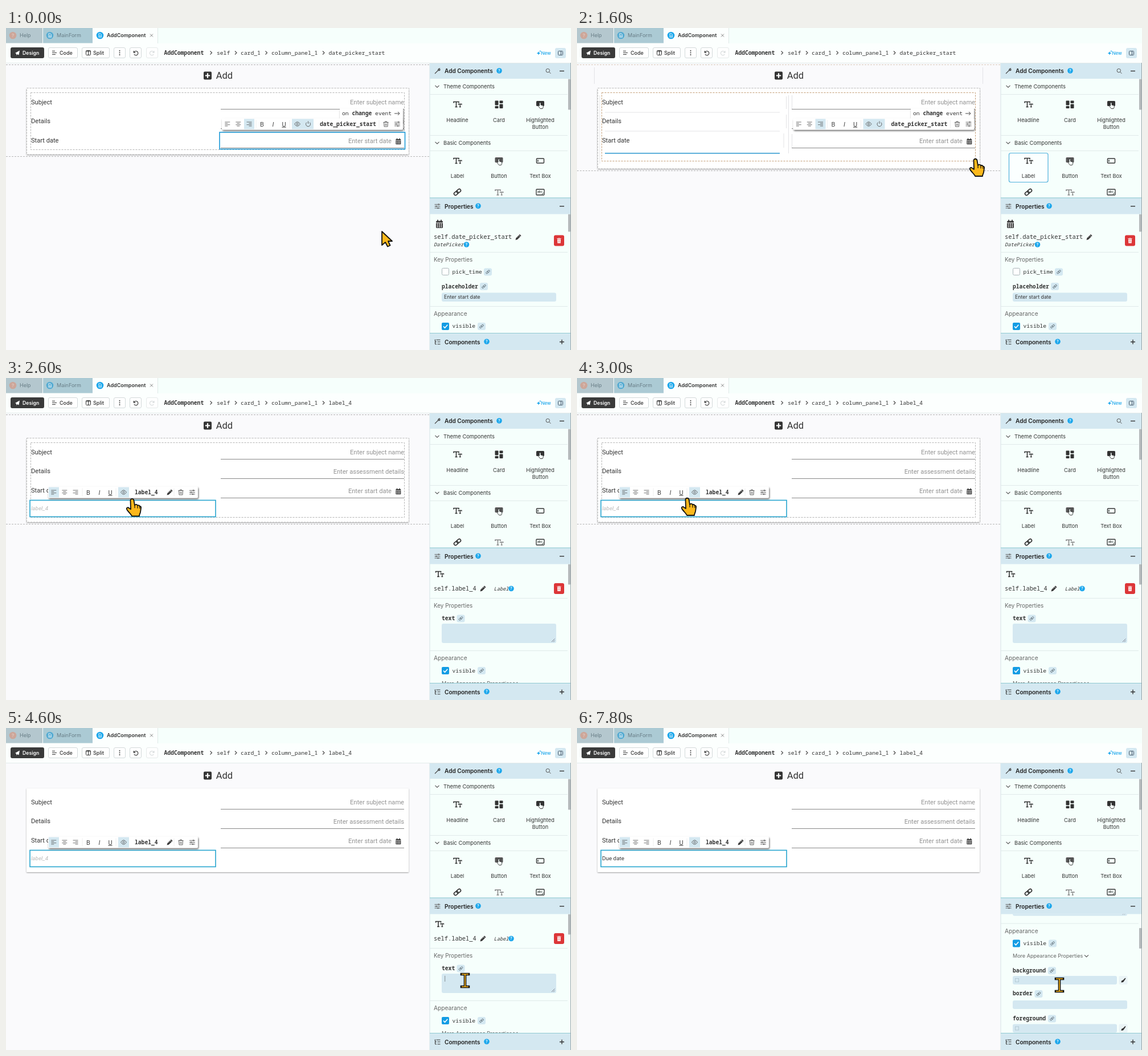
An HTML page that plays this animation: 992x565 px, repeating every 8 s.

```html
<!DOCTYPE html>
<html lang="en">
<head>
<meta charset="utf-8">
<title>Form designer</title>
<style>
html, body { margin: 0; width: 100%; height: 100%; overflow: hidden; background: #fafafc; }
svg { display: block; }
text { white-space: pre; }
.i { font-family: Inter, sans-serif; }
.r { font-family: Roboto, sans-serif; }
.m { font-family: "Noto Sans Mono", "DejaVu Sans Mono", monospace; }
</style>
</head>
<body>
<svg width="992" height="565" viewBox="0 0 992 565">
  <g id="back"></g>
  <g id="form"></g>
  <g id="front"></g>
  <g id="live"></g>
</svg>
<script>
const INK = '#333', BLUE = '#1ca7ec', PALE = '#d4e8f1', MINT = '#f6fffc', GREY = '#929292';
const $ = id => document.getElementById(id);

// drawing helpers
const text = (cls, x, y, s, size, fill = INK, more = '') =>
  `<text class="${cls}" x="${x}" y="${y}" font-size="${size}" fill="${fill}" ${more}>${s}</text>`;
const rect = (x, y, w, h, fill, r = 0, more = '') =>
  `<rect x="${x}" y="${y}" width="${w}" height="${h}" rx="${r}" fill="${fill}" ${more}/>`;
const line = (d, col = INK, w = 1, more = '') =>
  `<path d="${d}" fill="none" stroke="${col}" stroke-width="${w}" ${more}/>`;
const solid = (d, col = INK, more = '') => `<path d="${d}" fill="${col}" ${more}/>`;
const dot = (x, y, r, fill) => `<circle cx="${x}" cy="${y}" r="${r}" fill="${fill}"/>`;
const at = (x, y, s) => `<g transform="translate(${x} ${y})">${s}</g>`;
const hr = (y, x = 744, x2 = 986, col = '#e0eaea') => line(`M${x} ${y}H${x2}`, col);

const MID = 'text-anchor="middle"', END = 'text-anchor="end"';
const SEMI = 'font-weight="600"', BOLD = 'font-weight="700"', ITALIC = 'font-style="italic"';
const mono = (x, y, s, more = '', size = 9.7, col = INK) => text('m', x, y, s, size, col, more);
const ui = (x, y, s, size = 9.2, col = INK, more = '') => text('i', x, y, s, size, col, more);

// icons, centred on 0,0
const icon = {
  tt: (c = INK) => line('M-6.5-2.5V-4.5H2.5V-2.5M-2-4.5V4.5M-4 4.5H0', c, 1.6) +
    line('M2 .8V-.5H7.5V.8M4.8-.5V4.5M3.4 4.5H6.2', c, 1.3),
  card: () => rect(-7, -6.5, 6, 8, INK, 1) + rect(1, -6.5, 6, 4.5, INK, 1) +
    rect(-7, 3, 6, 4, INK, 1) + rect(1, -.5, 6, 7.5, INK, 1),
  press: c => rect(-7, -6, 14, 9, c, 1.5) +
    solid('M-1.5-2.5Q0-4 1-2.5V1L5 2Q6 5 4 7.5H0L-3.5 3Q-3 1.5-1.5 2.5Z', MINT, `stroke="${INK}" stroke-width=".9"`),
  box: () => rect(-6.5, -4, 13, 8, 'none', 1, `stroke="${INK}" stroke-width="1.4"`) + line('M-4-1.8V1.8', INK, 1.4),
  area: () => rect(-7, -5, 14, 10, 'none', 1, `stroke="${INK}" stroke-width="1.3"`) +
    ui(-5, 1, 'abc', 5, INK, SEMI) + line('M3 4L6 1'),
  link: (k = 1, c = INK) => `<g transform="rotate(-40) scale(${k})">` +
    rect(-7, -2.6, 8, 5.2, 'none', 2.6, `stroke="${c}" stroke-width="1.6"`) +
    rect(-1, -2.6, 8, 5.2, 'none', 2.6, `stroke="${c}" stroke-width="1.6"`) + '</g>',
  cal: (k = 1) => `<g transform="scale(${k})">` + rect(-6, -5.5, 12, 12.5, INK, 1.5) +
    line('M-3-7.5V-4M3-7.5V-4', INK, 1.8) +
    line('M-4.5 0H4.5M-4.5 2.5H4.5M-4.5 5H4.5', '#fff', 1.5, 'stroke-dasharray="2 1.4"') +
    line('M-6-2.2H6', '#fff', 1) + '</g>',
  pencil: () => solid('M-5 5L-4 1.5 2.5-5 5-2.5-1.5 4Z') + line('M1-3.5L3.5-1', '#fff', .8) + line('M-2.5 1.5L1.5-2.5', '#999', .8),
  trash: c => line('M-4.5-3H4.5M-1.5-3V-4.5H1.5V-3M-3.5-3L-3 4.5H3L3.5-3M-1-1V3M1-1V3', c, .9),
  bin: () => solid('M-3.6-4H-1.2L-.8-4.6H.8L1.2-4H3.6V-3H-3.6ZM-3-2.3H3L2.7 4.5H-2.7Z', '#fff') +
    line('M-1-1V3.2M1-1V3.2', '#dc3638', .6),
  sliders: () => line('M-5-3.2H5M-5 0H5M-5 3.2H5', '#555', .9) +
    [[2, -3.2], [-2, 0], [1, 3.2]].map(([x, y]) => dot(x, y, 1.3, '#666')).join(''),
  eye: () => line('M-5 0Q0-7.5 5 0Q0 7.5-5 0Z', '#555', .9) + `<circle r="1.6" fill="none" stroke="#555" stroke-width=".9"/>`,
  power: () => line('M-2.4-3A4 4 0 1 0 2.4-3M0-5V-.5', '#555', .9),
  align: k => line([-3.5, -1.2, 1.2, 3.5].map((y, n) => {
    const w = n % 2 ? 5 : 9;
    return `M${-4.5 + (9 - w) * k} ${y}h${w}`;
  }).join(''), '#555', .8),
  doc: () => line('M-2.2-3.2H1L2.5-1.5V3.2H-2.2ZM-1 0H1.2M-1 1.6H1.2', '#fff', .8),
  help: () => dot(0, 0, 4.8, BLUE) + ui(0, 2.5, '?', 7, '#fff', MID + SEMI),
  down: (c = '#555') => line('M-3.5-1.7L0 1.7 3.5-1.7', c, 1.1),
  brush: () => rect(-8, -7.5, 15, 15, '#eaf4f6', 2) + solid('M-4 4Q-4 0-1 0L3-4 4-3 1 1.5Q0 4-4 4Z')
};

const chip = (x, y) => rect(x, y - 6.5, 14, 13, PALE, 3) + at(x + 7, y, icon.link(.55, '#5d6c74'));
const check = (y, on) => on
  ? rect(765, y, 13, 13, '#149ce4', 2) + line(`M768 ${y + 6.5}l2.5 2.7 4.8-5.4`, '#fff', 1.6)
  : rect(765.5, y + .5, 12, 12, '#fff', 2, 'stroke="#aab4b8"');
const remove = y => rect(962, y - 9.5, 18, 19, '#dc3638', 3) + at(971, y, icon.bin());

const header = (y, h, label, qx, glyph, sign) => rect(744, y, 247, h, PALE) +
  at(757.5, y + h / 2, glyph) + ui(770, y + h / 2 + 3.8, label, 10.1, '#222', SEMI) +
  at(qx, y + h / 2 - .5, icon.help()) +
  line(`M972 ${y + h / 2}h8` + (sign ? `M976 ${y + h / 2 - 4}v8` : ''), INK, 1.4);

const button = (x, w, fill = '#fff', edge = '#d3d9da') =>
  rect(x + .5, 34.5, w - 1, 18, fill, 2.5, `stroke="${edge}"`);

function chrome() {
  const grid = [
    [792.5, 134, icon.tt(), ['Headline']], [865.5, 134, icon.card(), ['Card']],
    [938, 134, icon.press(INK), ['Highlighted', 'Button']],
    [792.5, 233, icon.tt(), ['Label']], [865.5, 233, icon.press('#555'), ['Button']],
    [938, 233, icon.box(), ['Text Box']]
  ];
  return rect(0, 0, 992, 61, '#fcfffe') + rect(267, 0, 725, 27, MINT) + hr(61.5, 0, 992, '#e2eae9') +
    rect(0, 0, 64, 26.5, '#b4c7ce') + rect(65, 0, 87, 26.5, '#abcad4') +
    dot(12, 13, 6.3, '#cda699') + ui(12, 16, '?', 8, '#e8d8d2', MID) + ui(24, 16.3, 'Help', 9, '#687d86') +
    dot(77, 13, 6.3, '#55abd2') + at(77, 13, icon.doc()) + ui(89, 16.3, 'MainForm', 9.1, '#687d86') +
    dot(165, 13, 6.3, BLUE) + at(165, 13, icon.doc()) + ui(177, 16.3, 'AddComponent', 9, '#333', SEMI) +
    line('M253 10.5l5 5m0-5l-5 5', '#777', .9) + line('M266.5 0V27', '#e0e8e8') +
    rect(8, 34, 59, 19, '#3a3a3a', 3) + solid('M16 44l8-4.5-1.5 8-2.5-1.5-1.5 2-.5-3z', '#fff') +
    ui(29, 46.8, 'Design', 8.7, '#fff', SEMI) +
    button(74, 52) + line('M81 40.5h5M81 43.5h8M81 46.5h6', INK, 1) + ui(94, 46.8, 'Code', 9, INK, 'font-weight="500"') +
    button(133, 49) + rect(140.5, 39.5, 8, 8, 'none', 1, `stroke="${INK}"`) + line('M144.5 39.5v8M140 41h9') +
    ui(153, 46.8, 'Split', 9, INK, 'font-weight="500"') +
    button(189, 21) + [40, 43.5, 47].map(y => dot(199.5, y, 1, INK)).join('') +
    button(217, 21) + line('M224.3 40v3.2h3.2M224.6 43a3.7 3.7 0 1 1 .3 3', INK, 1.1) +
    button(246, 21, '#fff', '#e6eaea') + line('M260 40v3.2h-3.2M259.7 43a3.7 3.7 0 1 0-.3 3', '#d5d9da', 1.1) +
    mono(277.5, 46.5, 'AddComponent', BOLD) + mono(370, 46.5, 'self') + mono(412, 46.5, 'card_1') +
    mono(466, 46.5, 'column_panel_1') +
    [360, 403.5, 457, 557.5].map(x => line(`M${x - 1.5} 40.5l3 3-3 3`, '#444', 1.1)).join('') +
    solid('M935 41l1 2.3 2.4 1-2.4 1-1 2.3-1-2.3-2.3-1 2.3-1zM938 39l.5 1.3 1.3.5-1.3.5-.5 1.3-.5-1.3-1.3-.5 1.3-.5z', BLUE) +
    ui(939.5, 46.8, 'New', 8, BLUE, 'font-weight="500"') +
    rect(964, 35, 19, 18, PALE, 3) + rect(969.5, 40.5, 8, 7, 'none', 1, 'stroke="#456"') + line('M974.5 40.5v7', '#456') +
    // side panel
    rect(744, 62, 248, 503, MINT) + line('M744 62V565', '#d5e3e5') +
    header(62, 27, 'Add Components', 866,
      line('M-4.5 4.5L1-1M1-1A3 3 0 0 1 4-4.5L2.5-2 4-1 5-3A3 3 0 0 1 1-1', '#444', 1.1)) +
    `<circle cx="951.3" cy="74.7" r="3.2" fill="none" stroke="#555"/>` + line('M953.7 77.2l2.8 2.8', '#555') +
    at(757, 102.5, icon.down()) + ui(768, 105.6, 'Theme Components', 9.4) + hr(116.5) + hr(188.5) +
    at(757, 201.5, icon.down()) + ui(768, 204.6, 'Basic Components', 9.4) + hr(215.5) +
    `<g id="hover"></g>` +
    grid.map(([x, y, g, names]) => at(x, y, g) +
      names.map((s, n) => ui(x, y + (y < 200 ? 31 : 30) + n * 12, s, 9.2, INK, MID)).join('')).join('') +
    `<svg x="744" y="270" width="248" height="28" viewBox="744 270 248 28">` +
    at(792.5, 288, icon.link()) + at(865.5, 288.5, icon.tt('#888')) + at(938, 288, icon.area()) + '</svg>' +
    rect(987, 89.5, 4, 54, '#b5b9bb', 1) +
    rect(744, 297.5, 248, 1.2, '#8cc6d2') +
    header(299, 27.5, 'Properties', 829, icon.sliders()) +
    rect(744, 535, 248, 1.2, '#8cc6d2') +
    header(536.5, 28.5, 'Components', 844,
      line('M-4-3.5V4H-1.5M-4 0H-1.5M0 0H5M0 4H5M-2-3.5H5M-5-3.5H-3', INK, 1), true) +
    line('M991.5 61V565', '#9aa6aa');
}

const fieldLine = y => line(`M377 ${y}H699`, '#888');
const label = (y, s) => text('r', 44, y, s, 11.1);
const prompt = (y, s, x = 699) => text('r', x, y, s, 11.1, GREY, END);

function dashes(bottom, drag) {
  const style = 'stroke-dasharray="3 2"';
  const box = (x, y, w, h, c) => rect(x, y, w, h, 'none', 0, `stroke="${c}" ${style}`);
  return line('M0 64.5H743', drag ? '#d8c8b8' : '#b3b3b3', 1, style) +
    line(`M0 ${bottom + 3.5}H743`, '#b8b8b8', 1, style) +
    box(36.5, 105.5, 671, bottom - 105.5, '#b8b8b8') +
    box(43.5, 113.5, 656, bottom - (drag ? 127 : 122), drag ? '#c39c74' : '#b3b3b3');
}

function toolbar(x, y, name, isDate) {
  const w = isDate ? 318 : 263, mid = y + 10, nameX = x + (isDate ? 172 : 152);
  const put = (dx, s) => at(x + dx, mid, s);
  const glyph = (dx, s, more) => text('r', x + dx, mid + 4, s, 11, '#444', MID + more);
  return rect(x, y, w, 20, '#fff', 2, 'filter="url(#lift)"') +
    rect(x + (isDate ? 39 : 1), y + 1, 18, 18, PALE) +
    rect(x + 123, y + 1, isDate ? 38 : 19, 18, PALE) +
    put(9.8, icon.align(0)) + put(28.8, icon.align(.5)) + put(48, icon.align(1)) +
    glyph(70.5, 'B', '') + glyph(90, 'I', ITALIC) +
    glyph(109, 'U', 'text-decoration="underline"') +
    put(132.5, icon.eye()) + (isDate ? put(151.5, icon.power()) : '') +
    mono(nameX, mid + 3.1, name, SEMI) +
    (isDate ? '' : put(213.5, icon.pencil())) +
    put(w - 30, icon.trash('#555')) + put(w - 10, icon.sliders()) +
    line([60, 119, w - 42].map(d => `M${x + d} ${y + 3}v14`).join(''), '#eee');
}

function form(s) {
  const bottom = s.label ? 253 : s.drag ? 247 : 222;
  const bump = s.drag ? .5 : 0;
  let out = rect(347, 76.5, 14, 14, INK, 2) + line('M354 79.3v8.4M349.8 83.5h8.4', '#fff', 2.2) +
    text('r', 368.8, 89.2, 'Add', 16.5) +
    rect(36, 106, 671, bottom - 106, '#fff', 1, 'filter="url(#card)"') +
    (s.inside ? dashes(bottom, s.drag) : '') +
    label(134, 'Subject') + label(167, 'Details') + label(200.7 + bump, 'Start date') +
    prompt(134, 'Enter subject name') + prompt(168, 'Enter assessment details') +
    fieldLine(142.5) + fieldLine(176.5) + fieldLine(210.5);
  if (!s.label && !s.drag) out += rect(375, 183, 325.5, 29.5, '#fff', 0, 'stroke="#1d9ad8" stroke-width="1.6"') + fieldLine(210.5);
  out += prompt(202, 'Enter start date', 677) + at(688.8, 199, icon.cal(.75));
  if (s.drag) out +=
    line('M30.5 69V98M712.5 69V98M49 148H356M49 181H356M371.5 118V220M367.5 120V142M367.5 152V176M363 185V210M377.5 118V142M377.5 186V210M40 118V238', '#e3e3e6') +
    line('M49 219.7H356', '#2a97cf', 1.6);
  if (!s.label) {
    out += rect(586, 141, 111, 19, '#fff', 1, 'filter="url(#lift)"') +
      mono(590, 153.1, 'on <tspan font-weight="700">change</tspan> event') +
      line('M682 150h9M688 147l3 3-3 3', '#444') + toolbar(379 + bump, 158.5, 'date_picker_start', true);
  } else {
    out += rect(42, 214.5, 326, 29, '#fff', 0, 'stroke="#27a5cf" stroke-width="1.6"') +
      (s.typed ? text('r', 44, 232, s.typed, 9.9) : text('r', 44, 232, 'label_4', 9.9, '#b9b9b9', ITALIC)) +
      toolbar(74, 190.5, 'label_4', false);
  }
  return out;
}

function dateProps() {
  return at(761, 344, icon.cal()) + mono(751, 370.2, 'self.date_picker_start', '', 10.4) + at(899.5, 367, icon.pencil()) +
    mono(751, 382.8, 'DatePicker', ITALIC, 8.7) + at(808.5, 380, icon.help()) + remove(373) + hr(393.5) +
    ui(751, 410, 'Key Properties', 9.9, '#666') + check(421, false) + mono(783.5, 431, 'pick_time') + chip(839, 428) +
    mono(765, 457, 'placeholder', SEMI) + chip(832, 453.5) +
    rect(765, 464.5, 201, 15.5, PALE, 3) + ui(769, 475.3, 'Enter start date', 8.8) + hr(488.5) +
    ui(751, 505, 'Appearance', 10.2, '#666') + check(517, true) + mono(783.5, 526.2, 'visible') + chip(828, 523.5);
}

function labelProps(s) {
  const caret = s.caret ? '<tspan font-weight="300">|</tspan>' : '';
  const swatch = y => rect(765, y, 183, 15, PALE, 3) +
    rect(769.5, y + 4.5, 6, 6, 'none', 0, 'stroke="#b5cbd5"') + at(959.5, y + 7.5, icon.brush());
  return at(761, 344, icon.tt()) + mono(751, 373, 'self.label_4', '', 10.4) + at(837.5, 369.5, icon.pencil()) +
    mono(856.5, 372.8, 'Label', ITALIC, 8.7) + at(887, 369.5, icon.help()) + remove(369.5) + hr(386.5) +
    ui(751, 403, 'Key Properties', 9.9, '#666') + mono(765, 425, 'text', SEMI) + chip(791.5, 422) +
    rect(765, 431, 201, 34, PALE, 3) + line('M958 463l5.5-5.5M961 463l2.5-2.5', '#667', .8) +
    ui(769.5, 443.3, s.typed + caret, 8.6) + hr(478.5) +
    ui(751, 495.3, 'Appearance', 10.2, '#666') + check(507, true) + mono(783.5, 516.5, 'visible') + chip(828, 513.5) +
    ui(765, 538.8, 'More Appearance Properties', 9.05, '#666') + at(894.5, 535.5, icon.down()) +
    mono(765, 564, 'background', SEMI) + chip(827, 561.2) + swatch(570.5) +
    mono(765, 604.8, 'border', SEMI) + chip(803.5, 602) + rect(765, 613.5, 201, 15, PALE, 3) +
    mono(765, 648.3, 'foreground', SEMI) + chip(827, 645.5) + swatch(655);
}

function props(s) {
  return `<svg x="744" y="326.5" width="248" height="208.5" viewBox="744 326.5 248 208.5">` +
    at(0, -s.scroll, s.label ? labelProps(s) : dateProps()) +
    rect(987, 326.5 + s.scroll * .18, 4, s.label ? 36 : 31, '#b5b9bb', 1) + '</svg>';
}

const HAND = 'M-3.5 3C-4-1 2-1.5 2.5 2.5L4 11C5 9 8.5 9 9 11.5 10.5 10.5 12.5 11 12.8 13 14.5 12.5 15.5 14 15 16L14 23C13.5 26 12 27 12 30H-1C-2 27-8 22-10 18-11 15-8 14-6 16L-3 18Z';
const BEAM = 'M-6-11H6M-6 11H6M0-11V11';
const EDGE = 'stroke="#111" stroke-width="1.8" stroke-linejoin="round"';
const pointer = {
  arrow: solid('M0 0V24L6 19 10 26.5 14.5 24.5 11 17H18Z', '#fcb81c', EDGE),
  hand: solid(HAND, '#fcb81c', EDGE) + line('M4 11V16M9 12V16.5M12.8 13.5V17', '#111', 1.2),
  beam: line(BEAM, '#111', 4.6, 'stroke-linecap="square"') + line(BEAM, '#fcb81c', 1.7)
};

// time, x, y, pointer shape
const path = [
  [0, 660, 357, 'arrow'], [200, 661, 356, 'arrow'], [400, 661, 356, 'arrow'], [600, 694, 335, 'arrow'],
  [800, 784, 262, 'hand'], [1000, 822, 234, 'hand'], [1200, 812, 234, 'hand'], [1400, 806, 235, 'hand'],
  [1600, 700, 230, 'hand'], [1800, 430, 219, 'hand'], [2000, 271, 214.5, 'hand'], [2400, 236, 213, 'hand'],
  [3000, 194, 211, 'hand'], [3200, 212, 218, 'hand'], [3400, 380, 280, 'arrow'], [3800, 745, 412, 'arrow'],
  [4000, 806, 443, 'beam'], [7000, 806, 443, 'beam'], [7200, 832, 448, 'beam'], [7400, 847, 451, 'beam'], [8000, 847, 451, 'beam']
];
const scrolls = [[0, 0], [7000, 0], [7200, 24], [7400, 74], [7600, 116], [7800, 135.5], [8000, 135.5]];

function sample(keys, t) {
  const n = keys.findIndex((k, i) => i + 1 === keys.length || t < keys[i + 1][0]);
  const a = keys[n], b = keys[n + 1] || a;
  const f = b === a ? 0 : (t - a[0]) / (b[0] - a[0]);
  return a.map((v, i) => typeof v === 'number' ? v + (b[i] - v) * f : v);
}

function draw(t) {
  const [, x, y, shape] = sample(path, t);
  const letters = Math.max(0, Math.floor((t - 5200) / 200) + 1);
  const s = {
    inside: x < 744,
    drag: t >= 1600 && t < 2600,
    label: t >= 2600,
    typed: 'Due date'.slice(0, letters),
    caret: (t >= 4200 && t < 4800) || (t >= 5200 && t < 6800),
    scroll: sample(scrolls, t)[1]
  };
  $('form').innerHTML = form(s);
  $('hover').innerHTML = s.drag
    ? rect(758.5, 219.5, 68.5, 51, '#fbffff', 3, 'stroke="#4fb0dc" stroke-width="1.2"')
    : t >= 800 && t < 1600 ? rect(758, 219, 70, 52, PALE, 4) : '';
  $('live').innerHTML = props(s) + mono(566.5, 46.5, s.label ? 'label_4' : 'date_picker_start') + at(x, y, pointer[shape]);
}

$('back').innerHTML = `<defs>
  <filter id="lift" x="-10%" y="-50%" width="120%" height="220%"><feDropShadow dx="1" dy="2" stdDeviation="1.6" flood-color="#000" flood-opacity=".6"/></filter>
  <filter id="card" x="-2%" y="-5%" width="104%" height="112%"><feDropShadow dx="0" dy="1" stdDeviation="1.1" flood-color="#000" flood-opacity=".38"/></filter>
  </defs>` + rect(0, 0, 992, 565, '#fafafc');
$('front').innerHTML = chrome();

const LOOP = 8000, STEP = 200, begin = performance.now();
let last = -1;
function tick() {
  const t = Math.floor((performance.now() - begin) % LOOP / STEP) * STEP;
  if (t !== last) draw(last = t);
  requestAnimationFrame(tick);
}
tick();
</script>
</body>
</html>
```
